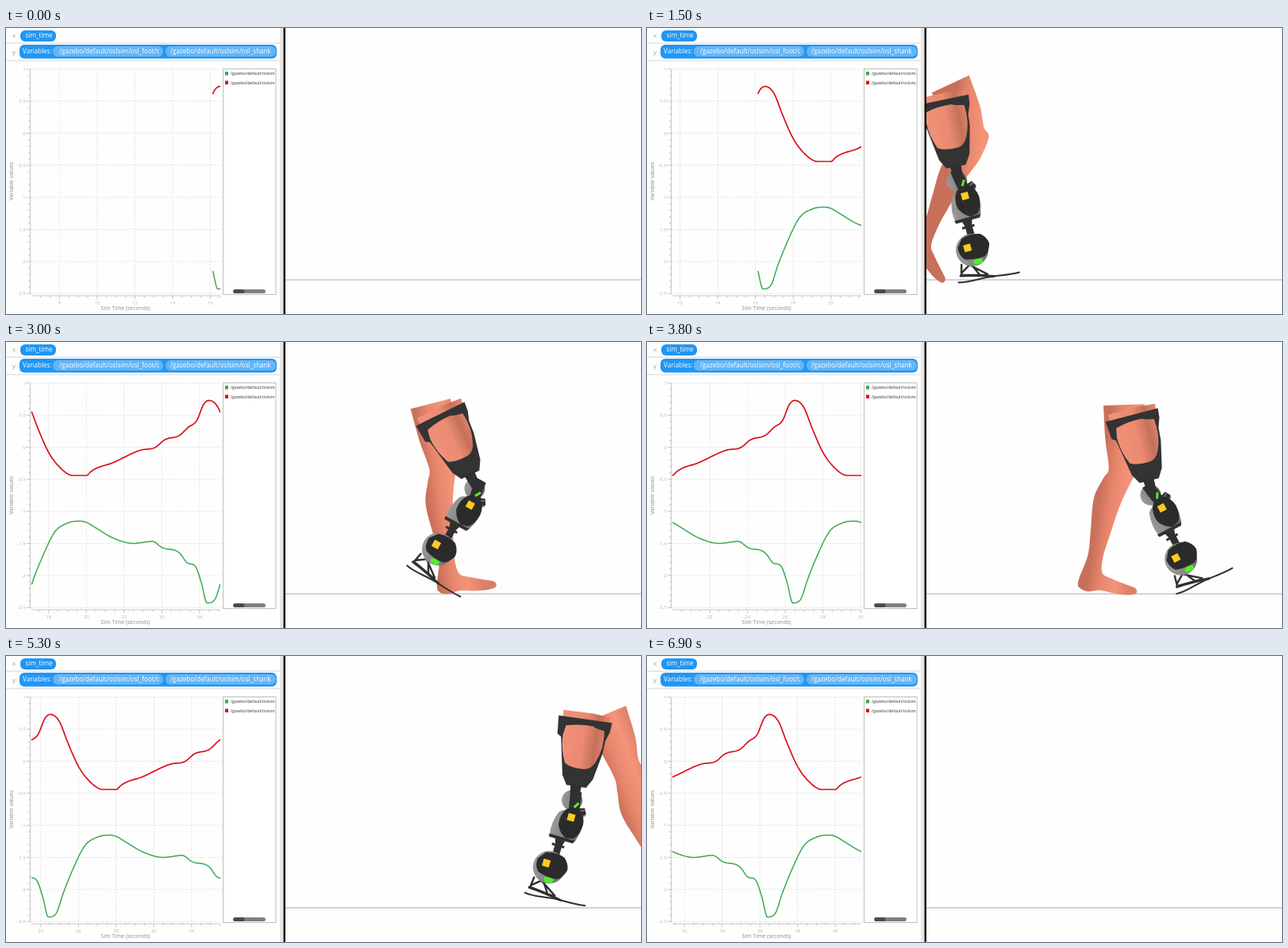
These frames come from a looping animation (800x360 px, 7 s). An HTML page:

```html
<!DOCTYPE html>
<html lang="en">
<head>
<meta charset="utf-8">
<title>Gait simulation</title>
<style>
html, body { margin: 0; width: 100%; height: 100%; overflow: hidden; background: #fff; }
svg { display: block; width: 800px; height: 360px; font-family: "Open Sans", Lato, sans-serif; }
.pill { font-size: 8.1px; fill: #fff; }
.tick { font-size: 5.8px; fill: #b4b4b4; }
.title { font-size: 6.9px; fill: #8c8c8c; }
.legend { font-size: 5.2px; fill: #333; }
.line { fill: none; stroke-linejoin: round; stroke-linecap: round; }
.axis { stroke: #b5b5b5; stroke-width: .8; }
.grid { stroke: #dadada; stroke-width: .8; stroke-dasharray: 2 1.5; }
</style>
</head>
<body>
<svg viewBox="0 0 800 360">
  <defs>
    <clipPath id="plotClip"><rect x="31" y="50" width="239" height="286"/></clipPath>
    <clipPath id="viewClip"><rect x="352" y="0" width="448" height="360"/></clipPath>
    <clipPath id="legendClip"><rect x="274" y="52" width="65" height="283"/></clipPath>
    <clipPath id="pillClip"><rect x="60" y="22" width="133" height="16"/></clipPath>
    <linearGradient id="skin" gradientUnits="userSpaceOnUse">
      <stop offset="0" stop-color="#c8705a"/>
      <stop offset=".3" stop-color="#e8866c"/>
      <stop offset=".65" stop-color="#f3957b"/>
      <stop offset="1" stop-color="#dc7f67"/>
    </linearGradient>
    <linearGradient id="stump">
      <stop offset="0" stop-color="#f0927a"/>
      <stop offset=".5" stop-color="#ea8a70"/>
      <stop offset=".75" stop-color="#c4705a"/>
      <stop offset="1" stop-color="#e98a70"/>
    </linearGradient>
    <linearGradient id="shell">
      <stop offset="0" stop-color="#9a9a9a"/>
      <stop offset="1" stop-color="#6e6e6e"/>
    </linearGradient>
  </defs>

  <rect width="800" height="360" fill="#fefefe"/>

  <g clip-path="url(#viewClip)">
    <path d="M352 317H800" stroke="#a9a9a9"/>
    <path id="leg" fill="url(#skin)"/>
    <g id="foot" class="line" stroke="#303030">
      <path stroke-width="2.4" d="M-16 20L-17 33L15 35M-16 30L-6 21L16 34M-4 20L6 34"/>
      <path stroke-width="2" d="M-21 42C-8 44 5 38 24 37S46 36 56 34"/>
      <path stroke-width="3" d="M-18 34Q0 34 24 37"/>
    </g>
    <g id="shank">
      <circle cx="2" cy="-87" r="13" fill="url(#shell)"/>
      <path fill="#303030" d="M-3-100H11L14-80L20-82L24-75L18-66H3L-1-86Z"/>
      <path stroke="#6a6a6a" stroke-width="2" d="M15-76L21-80M17-70L23-73"/>
      <path fill="url(#shell)" d="M-10-68Q-4-75 6-74L19-70Q24-66 23-50L20-38H-13Q-16-52-10-68Z"/>
      <path fill="#2b2b2b" d="M-2-74Q4-80 15-78Q23-72 24-61Q24-48 17-41L8-39Q-1-42-6-53Q-8-65-2-74Z"/>
      <path fill="#303030" d="M-14-39H20L18-35H-13ZM-5-35H8L6-29H9V-26H6V-14H-3V-26H-7V-29H-3Z"/>
      <path stroke="#54f02a" stroke-width="3" d="M7-79L11-86"/>
      <circle cx="-2" cy="2" r="20.5" fill="url(#shell)"/>
      <path fill="#2b2b2b" d="M-11-15Q2-19 13-15Q21-8 21 0Q18 10 11 14Q-4 15-14 11Q-20 5-19-5Z"/>
      <path fill="#4df224" d="M-5 16Q2 13 8 16L6 21H-3Z"/>
      <rect x="2.5" y="-70.5" width="9" height="9" fill="#ffcb1f"/>
      <rect x="-11.5" y="-6.5" width="9" height="9" fill="#ffcb1f"/>
    </g>
    <g id="thigh">
      <path fill="url(#stump)" d="M-28-111L10-112L33-110L27-60L18-36H-16L-26-80Z"/>
      <path fill="#333" fill-rule="evenodd" d="M-33-103L35-104L34-92L30-80L29-64L22-30L15-18H-10L-17-30L-26-77L-31-80Z
        M-22-92Q-5-97 12-96Q14-94 27-92Q30-70 22-52Q18-42 9-41Q-8-40-16-45Q-24-62-24-80Z"/>
      <path fill="#303030" d="M-5-20H9L8-2H-3Z"/>
    </g>
  </g>

  <g id="plot">
    <path id="gridY" class="grid"/>
    <g clip-path="url(#plotClip)">
      <path id="gridX" class="grid"/>
      <path id="green" class="line" stroke="#3da94f" stroke-width="1.5"/>
      <path id="red" class="line" stroke="#d8121a" stroke-width="1.7"/>
    </g>
    <path id="ticksY" class="axis"/>
    <path id="ticksX" class="axis"/>
    <path class="axis" d="M30.5 52V335M32 337H270"/>
    <text class="title" x="150.5" y="355" text-anchor="middle">Sim Time (seconds)</text>
    <text class="title" transform="translate(9 193) rotate(-90)" text-anchor="middle">Variable values</text>
  </g>

  <g id="panel">
    <path d="M0 19H345M0 41H345" stroke="#d4d4d4"/>
    <g font-size="8" fill="#a0a0a0"><text x="8" y="12">x</text><text x="8" y="33">y</text></g>
    <rect x="18" y="3" width="45" height="14" rx="6" fill="#2196f3"/>
    <rect x="17" y="21" width="324" height="17.5" rx="6" fill="#2196f3"/>
    <rect x="59" y="23" width="139" height="13" rx="6" fill="#64b5f6"/>
    <rect x="201" y="23" width="139" height="13" rx="6" fill="#64b5f6"/>
    <g class="pill">
      <text x="24.5" y="12">sim_time</text>
      <text x="21" y="32">Variables:</text>
      <text x="67" y="32" clip-path="url(#pillClip)">/gazebo/default/oslsim/osl_foot/osl</text>
      <text x="207" y="32">/gazebo/default/oslsim/osl_shank</text>
    </g>
    <rect x="273.5" y="51.5" width="66.5" height="284" fill="#fff" stroke="#bdbdbd"/>
    <rect x="276" y="55" width="4" height="4.5" fill="#3da94f"/>
    <rect x="276" y="66.5" width="4" height="4.5" fill="#d8121a"/>
    <g class="legend" clip-path="url(#legendClip)">
      <text x="283" y="59">/gazebo/default/oslsim/osl_foot</text>
      <text x="283" y="70.5">/gazebo/default/oslsim/osl_shank</text>
    </g>
    <rect x="286" y="329" width="41" height="5" rx="2.5" fill="#808080"/>
    <rect x="286.5" y="329" width="14" height="5" rx="2.5" fill="#4a4a4a"/>
    <rect x="345" width="4.5" height="360" fill="#e9e8e6"/>
    <rect x="349.5" width="2.5" height="360" fill="#111"/>
  </g>
</svg>

<script>
const LOOP = 7000, STEP = 100;
const GAIT = 10, STRIDE = 268.5, BASE = 2;   // stride time, length, and the stride that keys describe
const START = 16.14, SPAN = 10, RIGHT = 270, SCALE = 23.75;
const THIGH = 128, CALF = 131;

const $ = id => document.getElementById(id);
const set = (el, attrs) => Object.entries(attrs).forEach(([k, v]) => el.setAttribute(k, v));

// Smooth curve through [phase, value] keys, repeated every stride without overshoot.
function track(keys, drift = 0) {
  const n = keys.length;
  const key = i => {
    const k = Math.floor(i / n), [p, v] = keys[i - k * n];
    return [p + GAIT * k, v + drift * k];
  };
  const tangent = i => {
    const [[p0, v0], [p1, v1], [p2, v2]] = [key(i - 1), key(i), key(i + 1)];
    const a = (v1 - v0) / (p1 - p0), b = (v2 - v1) / (p2 - p1);
    if (a * b <= 0) return 0;
    const mean = (a * (p2 - p1) + b * (p1 - p0)) / (p2 - p0);
    return Math.sign(a) * Math.min(Math.abs(mean), 3 * Math.abs(a), 3 * Math.abs(b));
  };
  return s => {
    const k = Math.floor(s / GAIT), p = s - k * GAIT;
    const i = keys.filter(([start]) => start <= p).length - 1;
    const [a, u] = key(i), [b, v] = key(i + 1);
    const h = b - a, x = (p - a) / h, y = 1 - x;
    return u * y * y * (1 + 2 * x) + v * x * x * (3 - 2 * x) +
      h * x * y * (tangent(i) * y - tangent(i + 1) * x) + drift * (k - BASE);
  };
}

// Plotted curves, as heights on the stage.
const redY = track([[0, 168], [.25, 163], [1.4, 152], [2.9, 136], [3.7, 132], [4.1, 124],
  [5, 116.5], [5.4, 107.5], [5.85, 99], [6.25, 77.5], [6.5, 73.5], [7, 83], [7.4, 107],
  [8, 139], [8.6, 158], [9.3, 168]]);
const greenY = track([[0, 227], [.4, 232.5], [1.4, 246.5], [2.5, 253.5], [3.5, 251], [4, 258.5],
  [5, 267], [5.3, 277], [5.8, 283], [6.1, 303], [6.4, 328.5], [6.8, 324.5], [7.2, 298],
  [7.75, 266], [8.3, 240], [9, 228], [9.7, 225.5]]);

const valueY = v => 132.5 - 80.7 * v;
const toValue = y => (132.5 - y) / 80.7;
// The plotted values are the pitch of shank and foot, so they also pose the leg.
const shankAngle = s => -toValue(redY(s));
const footAngle = s => toValue(greenY(s)) + Math.PI / 2;

const sway = (s, peak) => Math.cos((s - peak) / GAIT * 2 * Math.PI);
const hipAt = s => [
  321.2 + STRIDE * (s / GAIT - BASE) - 10.5 * sway(s, 3.3),
  33 - 3 * sway(s, 3.3)
];

// Ankle paths of the prosthesis and of the natural leg.
const ankleX = track([[0, 405], [1, 411], [4.5, 411], [6, 434], [7.09, 546], [7.7, 588], [9.43, 697]], STRIDE);
const ankleY = track([[0, 270], [2, 277], [4.4, 277], [6.4, 256], [7.4, 261], [9.43, 250]]);
const heelX = track([[.3, 297], [1.4, 338], [3.3, 489.5], [3.81, 520], [4.75, 567], [7.09, 557.5], [9.6, 558]], STRIDE);
const heelY = track([[.3, 285], [1.4, 262], [3.81, 265], [4.4, 264], [5.2, 286], [7.09, 290], [9.6, 289]]);

// Positive angles swing the lower end forward.
const turn = ([x, y], a, [ox, oy]) => {
  const c = Math.cos(a), s = Math.sin(a);
  return [ox + x * c + y * s, oy - x * s + y * c];
};
const pose = (id, [x, y], a) =>
  set($(id), { transform: `translate(${x} ${y}) rotate(${-a * 180 / Math.PI})` });

const frontThigh = [[30, 45], [26, 85], [19, 112], [19, 126]];
const backThigh = [[-18, 124], [-21, 88], [-22, 45]];
const frontCalf = [[13, 14], [9, 45], [8, 85], [8, 112]];
const backCalf = [[-11, 114], [-17, 83], [-25, 44], [-21, 16]];
const sole = [[13, 2], [26, 8], [48, 14], [57, 17], [58, 23], [48, 26], [32, 26], [12, 24],
  [-2, 27], [-13, 24], [-16, 15]];

function smooth(pts) {
  const at = i => pts[Math.max(0, Math.min(pts.length - 1, i))];
  let d = "M" + pts[0];
  for (let i = 0; i < pts.length - 1; i++) {
    const [a, b, c, e] = [at(i - 1), at(i), at(i + 1), at(i + 2)];
    const c1 = b.map((v, j) => v + (c[j] - a[j]) / 6);
    const c2 = c.map((v, j) => v - (e[j] - b[j]) / 6);
    d += `C${c1} ${c2} ${c}`;
  }
  return d + "Z";
}

function drawNatural(s, hip) {
  const ankle = [heelX(s), heelY(s)];
  const dx = ankle[0] - hip[0], dy = ankle[1] - hip[1];
  const d = Math.min(Math.hypot(dx, dy), THIGH + CALF - .1);
  const line = Math.atan2(dx, dy);
  const thigh = line + Math.acos((THIGH ** 2 + d * d - CALF ** 2) / (2 * THIGH * d));
  const knee = turn([0, THIGH], thigh, hip);
  const calf = Math.atan2(ankle[0] - knee[0], ankle[1] - knee[1]);
  const place = (pts, a, o) => pts.map(p => turn(p, a, o));
  set($("leg"), { d: smooth([
    ...place(frontThigh, thigh, hip), ...place(frontCalf, calf, knee),
    ...place(sole, footAngle(s + GAIT / 2), ankle),
    ...place(backCalf, calf, knee), ...place(backThigh, thigh, hip)]) });
  const [x1, y1] = turn([-26, 0], line, knee), [x2, y2] = turn([28, 0], line, knee);
  set($("skin"), { x1, y1, x2, y2 });
}

function drawProsthesis(s, hip) {
  const ankle = [ankleX(s), ankleY(s)], shank = shankAngle(s) + .05;
  const knee = turn([2, -87], shank, ankle);
  pose("foot", ankle, footAngle(s) - .07);
  pose("shank", ankle, shank);
  pose("thigh", knee, Math.atan2(knee[0] - hip[0], knee[1] - hip[1]));
}

function addLabel(x, y, anchor, text = "") {
  const el = document.createElementNS("http://www.w3.org/2000/svg", "text");
  set(el, { x, y, class: "tick", "text-anchor": anchor });
  el.textContent = text;
  return $("plot").appendChild(el);
}

const xLabels = Array.from({ length: 6 }, () => addLabel(0, 348, "middle"));

function drawAxisY() {
  let grid = "", ticks = "";
  for (let i = 10; i >= -25; i--) {
    const y = valueY(i / 10), major = i % 5 === 0;
    ticks += `M${major ? 25.5 : 28} ${y}H30.5`;
    if (!major) continue;
    grid += `M31 ${y}H270`;
    addLabel(24.5, y + 2, "end", String(i / 10));
  }
  set($("gridY"), { d: grid });
  set($("ticksY"), { d: ticks });
}

function drawPlot(s) {
  const toX = v => RIGHT + (v - s) * SCALE;
  let grid = "", ticks = "", used = 0;
  for (let v = Math.ceil((s - SPAN) * 2) / 2; v <= s; v += .5) {
    const x = toX(v), major = v % 2 === 0;
    ticks += `M${x} 337V${major ? 341.5 : 339.5}`;
    if (!major) continue;
    grid += `M${x} 52V335`;
    set(xLabels[used], { x });
    xLabels[used++].textContent = v;
  }
  xLabels.slice(used).forEach(el => { el.textContent = ""; });
  set($("gridX"), { d: grid });
  set($("ticksX"), { d: ticks });

  const from = Math.max(START, s - SPAN), n = Math.ceil((s - from) / .04);
  for (const [id, curve] of [["red", redY], ["green", greenY]]) {
    const pts = Array.from({ length: n + 1 }, (_, i) => {
      const v = from + (s - from) * i / n;
      return toX(v).toFixed(2) + " " + curve(v).toFixed(2);
    });
    set($(id), { d: "M" + pts.join("L") });
  }
}

// Simulated seconds; the simulation runs a little slower at first.
const simTime = t => t < .9 ? 16.53 + 3.21 * t : 16.126 + 3.66 * t;

function draw(ms) {
  const s = simTime(Math.floor(ms % LOOP / STEP) * STEP / 1000);
  const hip = hipAt(s);
  drawPlot(s);
  drawNatural(s, hip);
  drawProsthesis(s, hip);
}

drawAxisY();
const began = performance.now();
function tick() {
  draw(performance.now() - began);
  requestAnimationFrame(tick);
}
tick();
</script>
</body>
</html>
```
